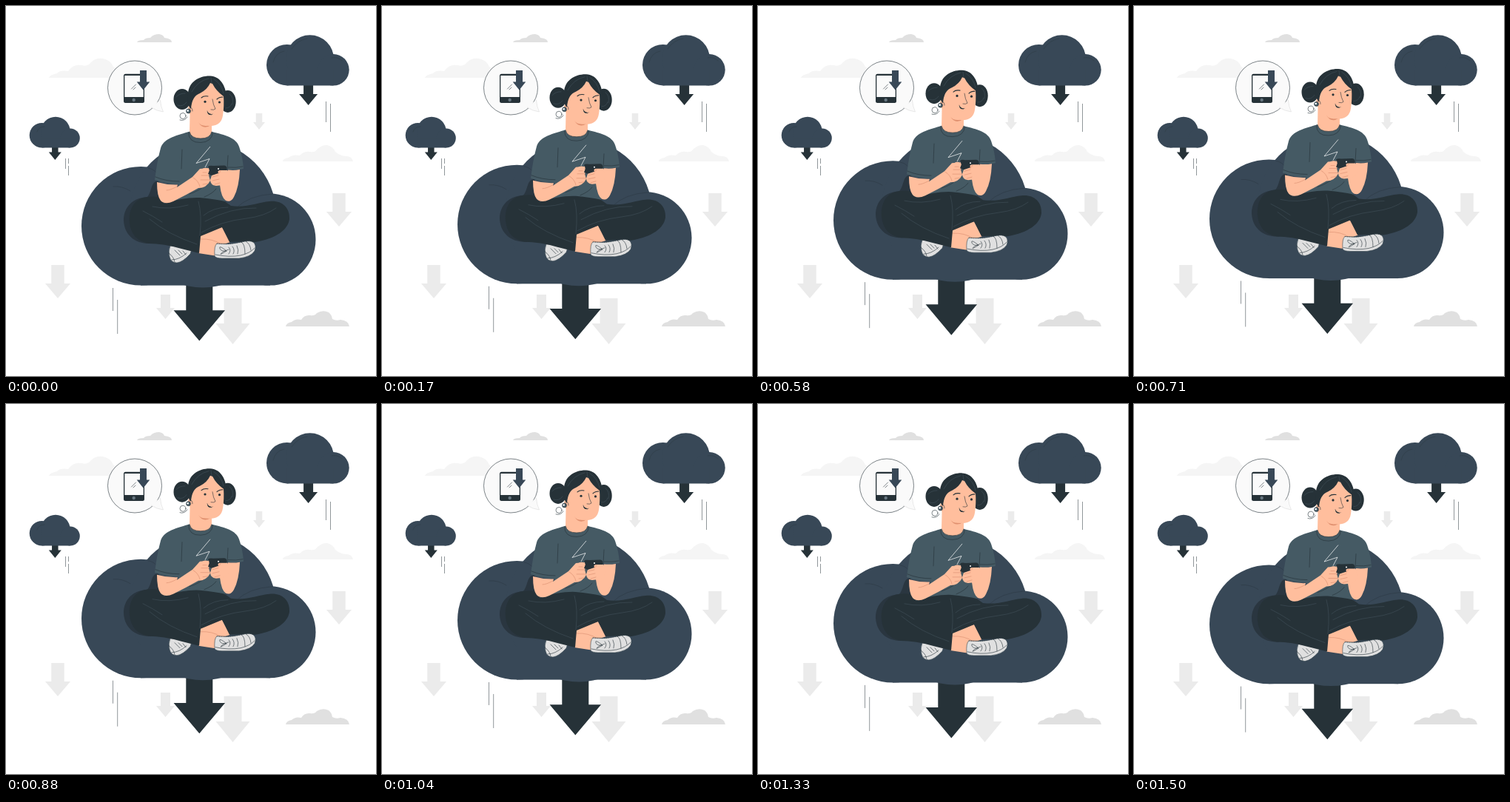
Recreate the animation shown at these times as an HTML page. Size 500 px wide and 500 px high, loop 1.54 s.

```html
<!DOCTYPE html>
<html lang="en">
<head>
<meta charset="utf-8">
<title>Cloud download</title>
<style>
html, body { margin: 0; width: 100%; height: 100%; overflow: hidden; background: #fff; }
svg { display: block; width: 100vw; height: 100vh; }
.cloud { fill: #384857; }
.dark { fill: #263238; }
.skin { fill: #ffbe9d; }
.shirt { fill: #455a64; }
.shoe { fill: #e0e0e0; stroke: #37474f; stroke-width: .6; }
.line { fill: none; stroke: #263238; stroke-width: .6; stroke-linecap: round; stroke-linejoin: round; }
.brow { fill: none; stroke: #263238; stroke-width: 1.1; stroke-linecap: round; }
.trail { fill: none; stroke: #263238; stroke-width: .6; stroke-opacity: .85; }
.fold { fill: none; stroke: #465760; stroke-width: .5; stroke-linecap: round; }
.crease { fill: none; stroke: #d98e6f; stroke-width: .6; stroke-linecap: round; }
.white { fill: none; stroke: #fff; stroke-width: .7; stroke-linejoin: round; }
</style>
</head>
<body>
<svg viewBox="0 0 500 500" xmlns="http://www.w3.org/2000/svg">
  <g id="back">
    <path fill="#f5f5f5" d="M58 97Q59 93 69 91Q73 86 84 88Q91 78 102 80Q108 82 112 79Q120 69 131 71Q141 73 145 82Q150 87 157 88Q171 90 173 97Z"/>
    <path fill="#e0e0e0" d="M177 49Q178 46 186 46Q188 43 195 43Q199 38 207 38Q213 39 214 43Q224 44 224 49Z"/>
    <path fill="#f5f5f5" d="M374 210Q374 206 382 205Q387 200 397 202Q402 196 411 197Q418 198 420 194Q427 187 434 188Q442 190 445 197Q452 203 461 203Q468 204 469 210Z"/>
    <path fill="#e0e0e0" d="M378 433Q379 428 386 427Q391 422 399 424Q403 417 411 418Q417 419 420 415Q428 410 436 414Q440 417 441 423Q446 426 452 424Q463 425 464 433Z"/>
    <g id="pale" fill="#ebebeb"></g>
  </g>

  <g id="small"></g>
  <path class="trail" d="M80.500 206V220M84.500 206V213M84.500 216V229M432.500 129V157M438.500 132V170"/>
  <path class="line" stroke-opacity=".5" d="M361 76Q364 63 376 61M386 58Q394 46 407 44M440 70Q448 68 454 74M42 170Q44 163 52 163"/>

  <g id="bubble">
    <circle cx="174" cy="110.500" r="36.500" fill="#fafafa" stroke="#263238" stroke-width=".6"/>
    <path fill="#fafafa" stroke="#d4d4d4" stroke-width=".5" d="M208.500 127Q209 136 212.500 143Q204 142 196 137"/>
    <rect class="dark" x="159" y="91.800" width="28" height="39.200" rx="2.500"/>
    <rect fill="#fafafa" x="160.300" y="94" width="25.400" height="29"/>
    <circle cx="172.700" cy="127" r="2.200" fill="#66757f"/>
    <path class="line" d="M169.500 112L175.500 106M172 113L175 110"/>
    <g id="icon"></g>
  </g>

  <g id="float">
    <path class="trail" d="M144.500 381V412M150.700 397V443"/>
    <g id="drop"></g>
    <g class="cloud">
      <circle cx="182.300" cy="297.300" r="80.300"/>
      <circle cx="266" cy="281.500" r="99"/>
      <circle cx="356.500" cy="315.600" r="62"/>
      <rect x="182" y="290" width="175" height="87.600"/>
    </g>
    <path class="line" stroke-opacity=".6" d="M145 244Q157 243 168 250M192 219Q199 220 203 225M311 273Q328 256 360 254"/>
    <path fill="#2a3640" d="M206 236C195 237 198 250 191 258C172 259 159 271 159 290C160 310 175 322 196 321L232 300Z"/>

    <g id="legs">
      <path class="shoe" d="M222 324Q219 331 221 339Q223 347 231 347Q239 346 249 335L252 326Z"/>
      <path class="line" d="M220 334Q227 339 228 346M228 330L235 337M233 330L238 335M239 331L243 336M224 343Q234 343 244 334"/>
      <path class="skin" d="M257 313L276 302L292 299L303 319L286 325L286 338L260 334Z"/>
      <path class="crease" d="M263 315Q279 314 291 322"/>
      <path class="dark" d="M207 258C192 256 181 259 175 265C168 272 166 283 167 293C169 309 177 318 193 321Q213 321 237 328L261 334L263 311L292 299L302 319Q320 318 337 319C366 314 381 302 383 288C384 271 371 262 356 264C341 265 326 273 304 270Q291 260 280 256Z"/>
      <path class="fold" d="M260 264Q265 282 262 310M198 271Q220 276 246 269M194 288Q219 309 258 322M185 277Q199 284 211 292M264 306Q290 291 325 287Q350 284 365 273M269 291Q304 272 338 273M267 283Q280 272 300 272"/>
      <path class="shoe" d="M285 321Q281 324 282 338Q284 341 292 341L315 341Q331 339 336 331Q339 323 334 319Q329 316 318 319Q302 323 285 321Z"/>
      <path class="line" d="M283 336Q302 340 317 337Q330 334 336 327M318 319Q323 321 323 335M324 318Q330 321 331 330M301 326Q305 330 301 335M306 325Q310 330 307 335M312 324Q315 330 313 335M298 331Q287 322 289 328Q291 332 298 331Q287 338 291 334Q294 331 301 329"/>
      <path class="line" stroke-dasharray="1 2" d="M285 321Q302 323 318 319Q329 316 334 319"/>
    </g>

    <g id="body">
      <path class="shirt" d="M247 170C226 176 213 180 209 192Q204 210 201 235Q216 241 234 241L237 219L232 247L213 267Q240 258 262 259Q282 261 296 264L299 221Q310 223 321 220Q320 204 315 190C311 178 296 174 278 170Z"/>
      <path class="skin" d="M300 221.500Q308 222.500 316 221Q315 245 308 258Q304 266 297 263Q291 259 289 242Z"/>
      <path class="line" d="M237 220L238 194M202 231Q216 237 234 237M299 221L300 202M300 218Q311 219 320 217M248 254Q261 250 271 241M268 258Q280 253 284 247"/>
      <path class="skin" d="M204 238Q218 242 232 241.500L231 245L252 231L262 220L275 219Q278 223 274 229L276 236Q271 246 260 246Q244 255 226 264Q215 269 209 263Q204 257 204 238Z"/>
      <path class="crease" d="M231 244Q222 249 217 249M253 232Q260 236 262 244M264 229L274 229M263 235L275 235M266 241L273 240"/>
      <path class="dark" d="M273 217Q275 215 280 216L295 215.500Q299 216 298.500 221L296 226Q293 230 278 229L273 227Q276 221 273 217Z"/>
      <circle cx="287" cy="220" r="1" fill="#fff"/>
      <path class="skin" d="M278 229L287 226Q285 222 290 222L299 222L302 231Q302 239 293 242L284 243Q276 242 276 235Z"/>
      <path class="skin" d="M264 221Q269 217 273 220Q277 223 271 225L264 227Z"/>
      <path class="crease" d="M279 231L287 229M279 236L288 234M282 241L289 239M290 223L287 227M271 225L266 225"/>
      <path class="white" d="M276 190L257 212.500L275 206.500L269 218"/>
    </g>

    <g id="head">
      <ellipse class="dark" cx="238" cy="126" rx="11.500" ry="14"/>
      <ellipse class="dark" cx="299.700" cy="129" rx="11" ry="15"/>
      <path class="skin" d="M249 125L248 171Q249 180 264 180Q275 180 278 171L278 160Z"/>
      <path class="shirt" d="M246.500 170Q247 185 263 184.500Q278 184 279.500 171L278 170Q276 179 263 179Q250 179 248 170Z"/>
      <path class="line" d="M248 170Q250 179 263 179Q276 179 278 170M246.500 171Q247 185 263 184.500Q278 184 279.500 171"/>
      <path fill="#e0906f" d="M260 157Q264 164 277 161Q266 168 260 157Z"/>
      <path class="skin" d="M249 124L267 104L282 102L294 121Q295 136 293 148Q291 161 278 162Q260 162 254 149Q246 147 246 139Q246 133 250 135Z"/>
      <path class="dark" d="M246 120C246 102 262 94 276 94.500C289 95 297 107 298 123L294 122Q284 115 279 105L276 104Q272 113 262 118Q251 122 250 139Q244 134 246 120Z"/>
      <path class="fold" d="M277 97L278 105M274 98Q259 101 251 116M281 99Q291 105 294 118M230 123Q234 118 242 118M232 134Q239 137 244 130M302 119Q308 123 306 133M297 138Q303 138 305 132"/>
      <circle cx="269" cy="129.300" r="1.600" class="dark"/>
      <circle cx="288.500" cy="130" r="1.600" class="dark"/>
      <path class="brow" d="M264 124Q267 121 273 122M285 126Q288 123 293 123"/>
      <path class="line" d="M279 126Q280 134 283 139Q281 141 277 140M272 142Q273 147 278 147L279 146M248 138Q252 136 252 142"/>
      <path class="dark" d="M272 143Q273 149 279 146Q276 147 272 143Z"/>
      <circle cx="246.500" cy="142" r="3" fill="#455a64" stroke="#263238" stroke-width=".6"/>
      <circle cx="245.700" cy="141.500" r="1.300" fill="#fff"/>
      <circle class="line" cx="239" cy="148.500" r="4"/>
      <path class="line" d="M235 154Q241 156 245 150"/>
    </g>
  </g>
</svg>
<script>
const $ = id => document.getElementById(id);
const NAVY = '#384857', INK = '#263238';

// Down arrow: centre, stem top, stem width, head top, head width, tip
function arrow(id, cx, top, stem, neck, head, tip, fill) {
  const s = stem / 2, h = head / 2;
  const d = `M${cx - s} ${top}H${cx + s}V${neck}H${cx + h}L${cx} ${tip}L${cx - h} ${neck}H${cx - s}Z`;
  $(id).insertAdjacentHTML('beforeend', `<path d="${d}"${fill ? ` fill="${fill}"` : ''}/>`);
}

// Three lobes sharing a flat base
function cloud(id, base, lobes) {
  const [l, , r] = lobes;
  const top = r[1];
  const dots = lobes.map(([x, y, rad]) => `<circle cx="${x}" cy="${y}" r="${rad}"/>`).join('');
  $(id).insertAdjacentHTML('beforeend',
    `<g class="cloud">${dots}<rect x="${l[0]}" y="${top}" width="${r[0] - l[0]}" height="${base - top}"/></g>`);
}

[
  [70, 350, 17.5, 375, 34, 395],
  [215.5, 390, 13, 408, 25, 423],
  [306.5, 395, 24, 429, 46, 457],
  [450, 253, 17.5, 278, 34, 298],
  [342, 145, 8.5, 157, 16, 167]
].forEach(a => arrow('pale', ...a));

arrow('small', 66.3, 190, 8.5, 197.5, 17, 208, INK);
arrow('small', 408.6, 105, 13, 119, 25, 134, INK);
cloud('small', 191.5, [[48.5, 174.7, 16.8], [67, 169.5, 19.8], [86.8, 178.5, 13]]);
cloud('small', 107.5, [[379.7, 79.7, 27.7], [410.7, 71.5, 32.3], [442.5, 86.3, 21.2]]);
arrow('icon', 185.5, 87, 9, 102.5, 17.5, 113.5, NAVY);
arrow('drop', 261.3, 370, 36, 411.2, 69.5, 452.6, INK);

const LOOP = 1540, STEP = 1000 / 24, TURN = 17, SPEED = 0.56;
const start = performance.now();

function draw(now) {
  const t = Math.max(0, now - start) % LOOP;
  const step = Math.floor((t + 5) / STEP);          // motion runs at 24 steps a second
  const rise = Math.min(Math.abs(step - TURN) * SPEED, 10.1) - TURN * SPEED;
  $('float').setAttribute('transform', `translate(0 ${rise.toFixed(2)})`);
  requestAnimationFrame(draw);
}
draw(start);
</script>
</body>
</html>
```
